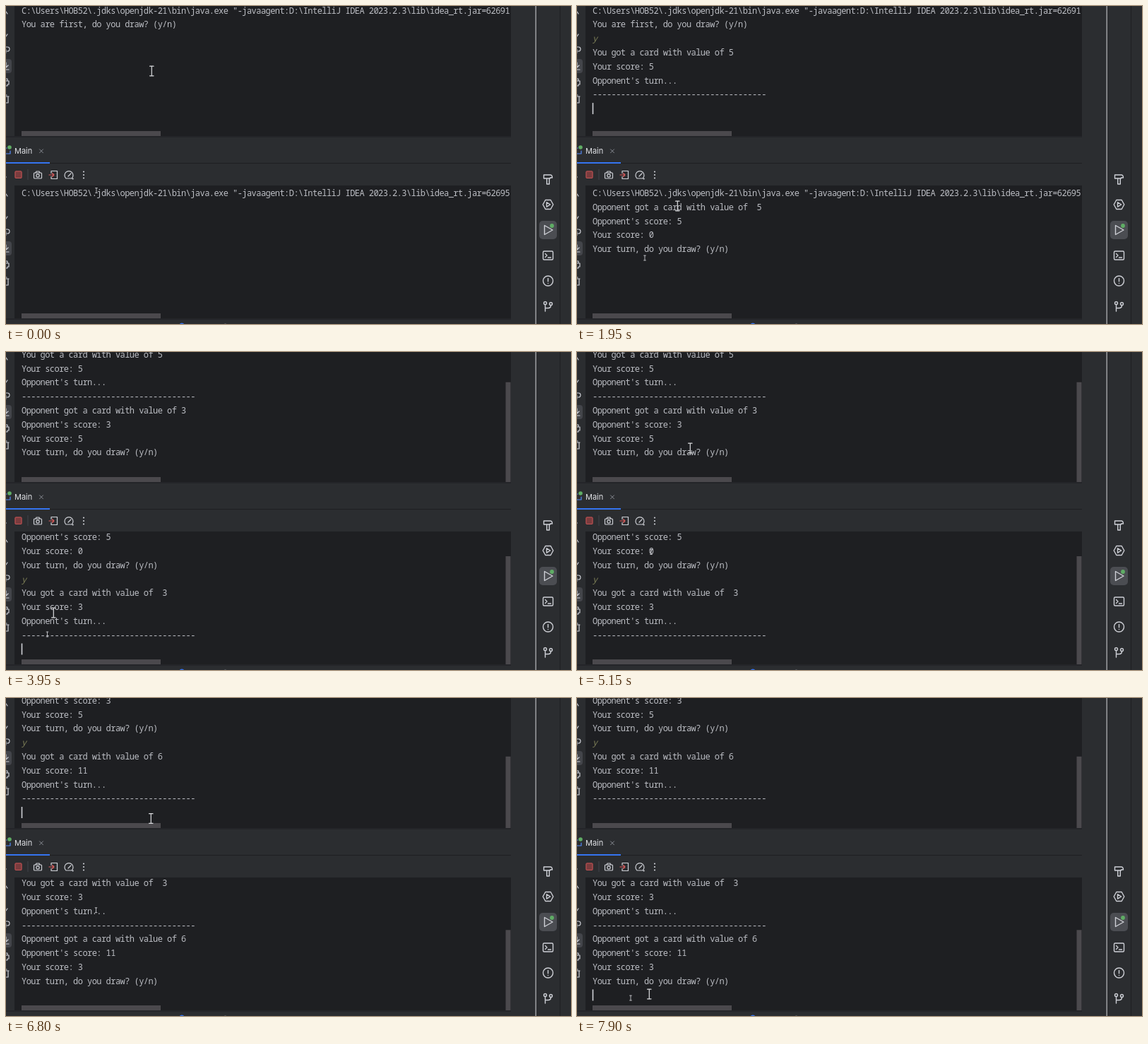
An HTML page with a canvas that plays this animation: 800x450 px, repeating every 8 s.

```html
<!DOCTYPE html>
<html lang="en">
<head>
<meta charset="utf-8">
<title>Card game consoles</title>
<style>
html, body { margin: 0; width: 100%; height: 100%; overflow: hidden; background: #2b2d30; }
canvas { display: block; }
</style>
</head>
<body>
<canvas id="stage" width="800" height="450"></canvas>
<script>
const ctx = document.getElementById('stage').getContext('2d');
const LOOP = 8000, BLINK = 500, REPLY = 150, SETTLE = 450;
const LINE = 19.8, PITCH = 6.645, LEFT = 22, RIGHT = 715;
const MONO = '12px "Noto Sans Mono", "DejaVu Sans Mono", monospace';
const PANEL = '#2b2d30', DARK = '#1e1f22', INK = '#bcbec4', ICON = '#ced0d6';
const THUMB = '#4b494d', BLUE = '#3574f0', GREEN = '#5fad65', MUTED = '#868a91';

// The two players alternate; each turn is a click, a typed answer and Enter.
const turns = [
  { card: 5, click: 150, typed: 700, entered: 1200, gap: ' ' },
  { card: 3, click: 2600, typed: 3200, entered: 3750, gap: ' ' },
  { card: 6, click: 5600, typed: 5850, entered: 6600, gap: '' },
  { click: 7900 }
];

const command = port => 'C:\\Users\\HOB52\\.jdks\\openjdk-21\\bin\\java.exe "-javaagent:D:\\IntelliJ IDEA 2023.2.3\\lib\\idea_rt.jar=' + port;
const consoles = [
  { y: -4, lines: [command(62691), 'You are first, do you draw? (y/n)'].map(text => ({ time: 0, text })) },
  { y: 254.4, lines: [{ time: 0, text: command(62695) }] }
];

function playGame() {
  const scores = [0, 0];
  turns.forEach(({ card, typed, entered, gap }, i) => {
    if (!card) return;
    const me = i % 2, other = 1 - me;
    scores[me] += card;
    const print = (who, time, ...texts) => texts.forEach(text => consoles[who].lines.push({ time, text }));
    const got = who => ' got a card with value of ' + (who ? gap : '') + card;
    print(me, typed, 'y');
    print(me, entered + REPLY, 'You' + got(me), 'Your score: ' + scores[me], "Opponent's turn...", '-'.repeat(37));
    print(other, entered + REPLY, 'Opponent' + got(other), "Opponent's score: " + scores[me],
      'Your score: ' + scores[other], 'Your turn, do you draw? (y/n)');
  });
}
playGame();

// time, x, y
const pointer = [
  [0, 206, 92], [1250, 206, 92], [1950, 142, 283], [2500, 70, 405], [2850, 67, 369], [4350, 67, 369],
  [5150, 160, 136], [5850, 160, 150], [6200, 172, 169], [6500, 207, 170], [7100, 203, 171],
  [7650, 102, 419], [LOOP, 102, 419]
];

function rect(x, y, w, h, color, r = 0) {
  ctx.fillStyle = color;
  ctx.beginPath();
  ctx.roundRect(x, y, w, h, r);
  ctx.fill();
}

function dot(x, y, r, color) {
  rect(x - r, y - r, 2 * r, 2 * r, color, r);
}

// Strokes a path given relative to its centre.
function icon(x, y, path, color = ICON, width = 1.2) {
  ctx.save();
  ctx.translate(x, y);
  ctx.strokeStyle = color;
  ctx.lineWidth = width;
  ctx.lineCap = ctx.lineJoin = 'round';
  ctx.stroke(new Path2D(path));
  ctx.restore();
}

function frameIcon(x, y, w, h, r, color = ICON, width = 1.4) {
  ctx.strokeStyle = color;
  ctx.lineWidth = width;
  ctx.beginPath();
  ctx.roundRect(x - w / 2, y - h / 2, w, h, r);
  ctx.stroke();
}

const ring = (x, y, r, width) => frameIcon(x, y, 2 * r, 2 * r, r, ICON, width);

// Blinks from the last activity in the focused console.
function caretOn(who, t) {
  const i = turns.findLastIndex(turn => turn.click <= t);
  if (i < 0 || i % 2 !== who) return false;
  const { click, typed, entered } = turns[i];
  const last = Math.max(...[click, typed, entered, entered + SETTLE].filter(time => time <= t));
  return (t - last) % (2 * BLINK) < BLINK;
}

function drawConsole({ y, lines }, who, t) {
  const height = 188, shown = lines.filter(line => line.time <= t);
  const answering = turns.some((turn, i) => i % 2 === who && t >= turn.typed && t < turn.entered);
  const last = shown.length - (answering ? 1 : 0);
  const offset = Math.max(0, 10.5 + last * LINE - 166);
  const rowY = row => y + 10.5 + row * LINE - offset;

  ctx.save();
  ctx.beginPath();
  ctx.rect(12, Math.round(y), RIGHT - 12, height);
  ctx.clip();
  rect(12, y - 1, RIGHT - 12, height + 2, DARK);
  ctx.font = MONO;
  ctx.letterSpacing = '0px';
  ctx.letterSpacing = PITCH - ctx.measureText('0').width + 'px';
  shown.forEach(({ text }, row) => {
    const typed = text === 'y';
    ctx.font = (typed ? 'italic ' : '') + MONO;
    ctx.fillStyle = typed ? '#7f8058' : INK;
    ctx.fillText(text, LEFT, rowY(row) + 4.1);
  });
  ctx.letterSpacing = '0px';
  if (caretOn(who, t)) rect(LEFT - 0.3 + (answering ? PITCH : 0), rowY(last) - 8, 1.6, 16, ICON);
  rect(LEFT, Math.round(y + 181), 197, 8, THUMB);
  if (offset) {
    const thumb = height * offset / (height + offset);
    rect(RIGHT - 7.5, y + thumb, 7, height - thumb, THUMB);
  }
  ctx.restore();
}

function drawGutter(y) {
  icon(0, y + 12, 'M-3 -2L0 -4L2 -1');
  icon(0, y + 40, 'M-3 2L0 3L2 0');
  icon(0, y + 62, 'M-5 -4H2Q5 -4 5 -1Q5 2 2 2H-2M0 0L-2 2L0 4');
  rect(-10, y + 75, 18, 20, '#43454a', 4);
  icon(0, y + 85, 'M0 -5V2M-3 -1L0 2L3 -1M-5 5H4');
  icon(0, y + 108, 'M-3 -2V-5H2V-2M-4 -2H4V3H2V5H-3');
  icon(0, y + 132, 'M-5 -4H4M-2 -6H1M3 -4V5H-4');
}

function drawToolbar() {
  rect(0, 184, RIGHT, 70, PANEL);
  rect(0, 184.5, RIGHT, 1, DARK);
  rect(0, 222, RIGHT, 1, DARK);
  rect(0, 221, 62, 2, BLUE);
  icon(1, 205, 'M-6 -4H0M5 0V4H-6', '#548af7');
  dot(5, 200, 2.8, GREEN);
  ctx.font = '11px Inter, "Noto Sans", sans-serif';
  ctx.fillStyle = '#dfe1e5';
  ctx.fillText('Main', 12, 209);
  icon(50, 205.3, 'M-2.5 -2.5L2.5 2.5M2.5 -2.5L-2.5 2.5', MUTED, 1);

  dot(0, 242, 0.8, ICON);
  rect(12.5, 233.5, 10, 10.5, '#7a3c3e', 1.5);
  frameIcon(17.5, 238.7, 9, 9.6, 1, '#c25354', 1);
  rect(30.5, 231, 1, 15, '#43454a');
  frameIcon(45, 240, 11, 8, 1, ICON, 1.2);
  icon(45, 236, 'M-3 0L-2 -2H2L3 0');
  ring(45, 240, 2.2, 1.2);
  icon(67.5, 239, 'M-3.5 -2.5V-5.5H5V5.5H-3.5V2.5');
  icon(66, 239, 'M-5 0H2M-.5 -2.5L2 0L-.5 2.5', '#db5c5c');
  icon(89, 239, 'M-4 5A6 6 0 1 1 4 5ZM-1 2L3 -2');
  icon(94.5, 244.5, 'M0 0H.2', ICON, 2);
  for (const dy of [-4.5, 0, 4.5]) dot(110, 239 + dy, 1.1, ICON);
}

function drawSidebar() {
  rect(RIGHT, 0, 85, 450, PANEL);
  rect(784, 0, 1, 450, DARK);
  rect(749.4, 0, 1.6, 450, '#97989b');
  const x = 767.5;
  const slotY = slot => 245 + 36 * slot;
  icon(x, slotY(0), 'M-6 -6H3Q6 -6 6 -2H3V-1H-6ZM-1.8 -1V7H1.8V-1', ICON, 1.4);
  icon(x, slotY(1), 'M-3.7 -6.5H3.7L7.3 0L3.7 6.5H-3.7L-7.3 0ZM-2 -3.2L3.2 0L-2 3.2Z', ICON, 1.4);
  rect(755, slotY(2) - 13, 25, 26, '#4b4d52', 5);
  icon(x, slotY(2), 'M-5 -6.5L6.5 0L-5 6.5Z', ICON, 1.4);
  dot(773, slotY(2) - 6, 3.6, '#4b4d52');
  dot(773, slotY(2) - 6, 2.9, GREEN);
  frameIcon(x, slotY(3), 14, 12, 1.5);
  icon(x, slotY(3), 'M-4 -2.5L-1.5 0L-4 2.5M0 3H4', ICON, 1.4);
  ring(x, slotY(4), 7);
  icon(x, slotY(4), 'M0 -3.5V.8M0 3.4V3.6', ICON, 1.4);
  ring(x - 4, slotY(5) - 4.5, 2);
  ring(x + 4, slotY(5) - 3.5, 2);
  icon(x, slotY(5), 'M-4 -2.5V7M4 -1.5Q4 2.5 0 2.5H-4', ICON, 1.4);
}

function beam(x, y, size, color, width) {
  const w = 0.4 * size;
  icon(x, y, `M${-w} ${-size}H${w}M0 ${-size}V${size}M${-w} ${size}H${w}`, color, width);
}

function drawPointer(t) {
  const i = pointer.findIndex(point => point[0] > t);
  const [t0, x0, y0] = pointer[i - 1];
  const [t1, x1, y1] = pointer[i];
  const k = (t - t0) / (t1 - t0), ease = k * k * (3 - 2 * k);
  const x = x0 + (x1 - x0) * ease, y = y0 + (y1 - y0) * ease;
  beam(x + 0.3, y, 6.8, '#dcdde0', 1.2);
  // A half-size copy mirrors the pointer.
  beam(x / 2 + 25, y / 2 + 215, 3.4, '#c4c6ca', 0.9);
}

function draw(t) {
  rect(0, 0, 800, 450, PANEL);
  consoles.forEach((pane, who) => drawConsole(pane, who, t));
  drawGutter(0);
  drawGutter(258);
  drawToolbar();
  rect(0, 442.5, 750, 1, DARK);
  dot(249, 452, 3.6, BLUE);
  icon(310.5, 453, 'M-3 0A3 3 0 0 1 3 0', MUTED);
  drawSidebar();
  drawPointer(t);
}

const start = performance.now();
function frame() {
  draw((performance.now() - start) % LOOP);
  requestAnimationFrame(frame);
}
frame();
</script>
</body>
</html>
```
